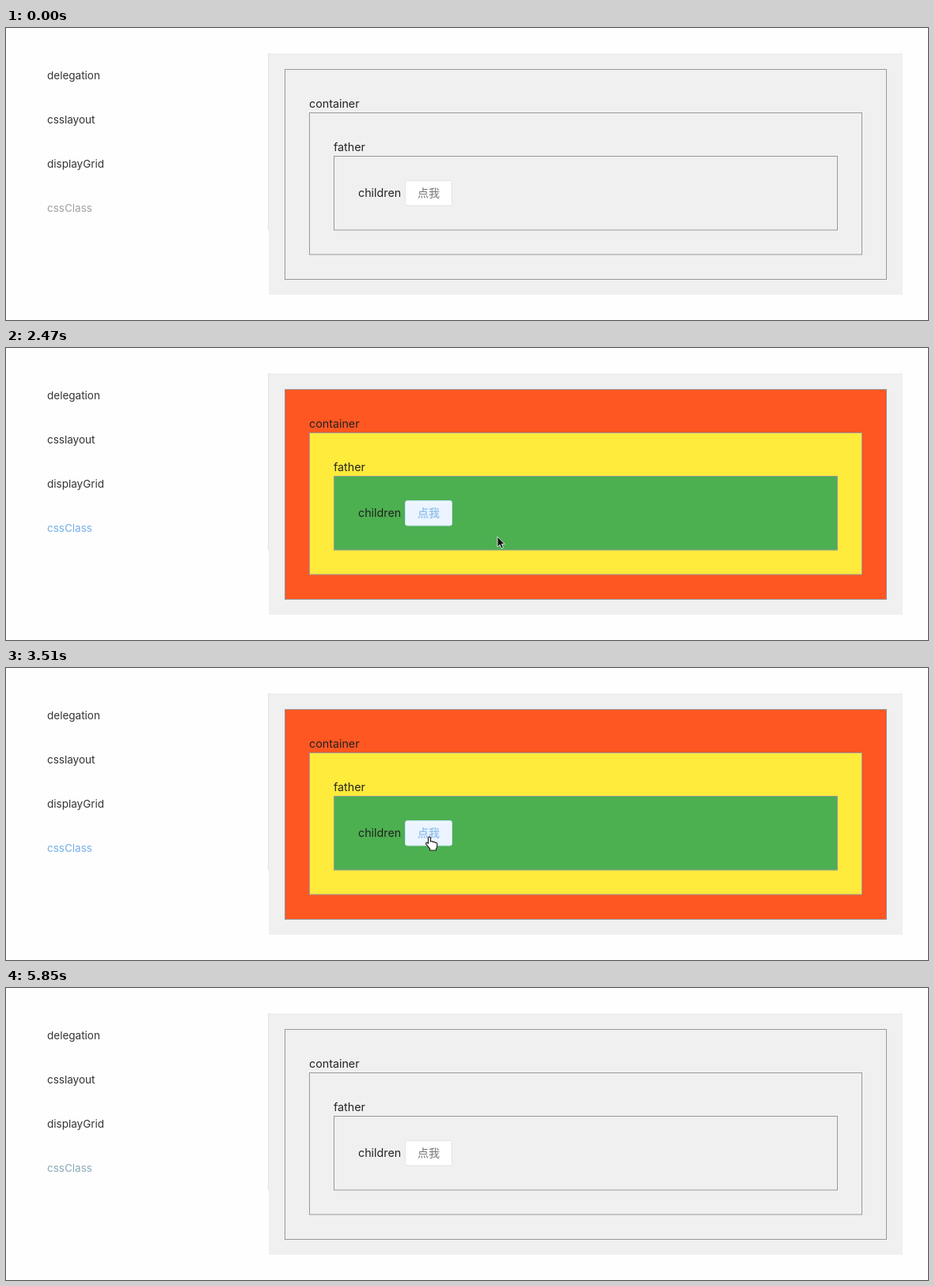
Recreate the animation shown at these times as an HTML page. Size 1165 by 370 pixels, loop 6500 ms.

```html
<!DOCTYPE html>
<html lang="en">
<head>
<meta charset="utf-8">
<title>Event bubbling</title>
<style>
html, body { margin: 0; width: 100%; height: 100%; overflow: hidden; background: #fefefe; }
svg { display: block; }
text { font-family: Inter, "Liberation Sans", sans-serif; font-size: 14.3px; fill: #222; }
.nav text { font-size: 13.5px; fill: #333; }
.boxes rect { fill: transparent; stroke: #999; }
.boxes.on .container { fill: #ff5722; }
.boxes.on .father { fill: #ffeb3b; }
.boxes.on .children { fill: #4caf50; }
.button rect { fill: #fff; stroke: #e4e4e4; }
.button text { font: 500 14px "Noto Sans CJK SC", "Noto Sans CJK", sans-serif; fill: #777; }
.button.hover rect { fill: #ecf5ff; stroke: #c6e2ff; }
.button.hover text { font-weight: 700; fill: #9ac6ee; }
</style>
</head>
<body>
<svg width="1165" height="370" viewBox="0 0 1165 370">
  <g class="nav">
    <text x="52" y="65">delegation</text>
    <text x="52" y="121">csslayout</text>
    <text x="52" y="177">displayGrid</text>
    <text x="52" y="233" id="link">cssClass</text>
  </g>
  <path d="M331.5 32V256" stroke="#e2e2e2"/>
  <rect x="332" y="32" width="801" height="306" fill="#f0f0f0"/>
  <g class="boxes" id="boxes">
    <rect class="container" x="352.5" y="52.5" width="760" height="266"/>
    <rect class="father" x="383.5" y="107.5" width="698" height="179.5"/>
    <rect class="children" x="414.5" y="162.5" width="636" height="93.5"/>
  </g>
  <text x="383" y="101">container</text>
  <text x="414" y="156">father</text>
  <text x="445" y="213.5">children</text>
  <g class="button" id="button">
    <rect x="504.5" y="193.5" width="59" height="31.5" rx="2.5"/>
    <text x="520" y="214">点我</text>
  </g>
  <g id="cursor" stroke-linejoin="round">
    <path id="arrow" d="M0 0V13l3-2.8 2 4.8 2.3-1-2-4.6H9z" fill="#111" stroke="#fff" stroke-width=".8"/>
    <path id="hand" d="M-1.5 1.4a1.5 1.5 0 0 1 3 0V6q2.6-1.2 3 .6q2.4-.9 2.9.7q2.4-.4 2.3 1.7v3q0 1.5-1.3 3.3V17H.7v-1.8L-4.1 9.4q-1-1.6.4-2.2q1-.3 2.2 1.3z" fill="#fff" stroke="#222" stroke-width="1.2"/>
  </g>
</svg>
<script>
const STEP = 130, LOOP = 6500;
// Pointer path: step, x, y
const path = [
  [6, 596, 298], [8, 540, 222], [9, 528, 213], [17, 528, 213],
  [19, 621, 239], [21, 626, 242], [25, 538, 215], [26, 535, 214],
  [31, 535, 214], [33, 638, 207], [38, 638, 207], [39, 634, 290]
];
const el = id => document.getElementById(id);
const [link, boxes, button, cursor, arrow, hand] =
  ["link", "boxes", "button", "cursor", "arrow", "hand"].map(el);
const within = (s, from, to) => s >= from && s < to;
const show = (node, visible) => node.setAttribute("visibility", visible ? "visible" : "hidden");

function pointerAt(s) {
  const i = path.findIndex(p => p[0] >= s);
  const b = path[i], a = path[i - 1] || b;
  const k = a === b ? 0 : (s - a[0]) / (b[0] - a[0]);
  return [a[1] + (b[1] - a[1]) * k, a[2] + (b[2] - a[2]) * k];
}

function draw(now) {
  const s = Math.floor(now % LOOP / STEP);
  boxes.classList.toggle("on", within(s, 11, 20) || within(s, 27, 34));
  button.classList.toggle("hover", within(s, 8, 39));
  link.style.fill = s < 6 ? "#a0a0a0" : s < 44 ? "#74aeea" : "#8aa9b8";

  const visible = within(s, 6, 40);
  let overButton = false;
  if (visible) {
    const [x, y] = pointerAt(s);
    overButton = within(x, 504, 564) && within(y, 193, 226);
    cursor.setAttribute("transform", `translate(${x} ${y})`);
  }
  show(arrow, visible && !overButton);
  show(hand, overButton);
}

const start = performance.now();
function tick() {
  draw(performance.now() - start);
  requestAnimationFrame(tick);
}
tick();
</script>
</body>
</html>
```
